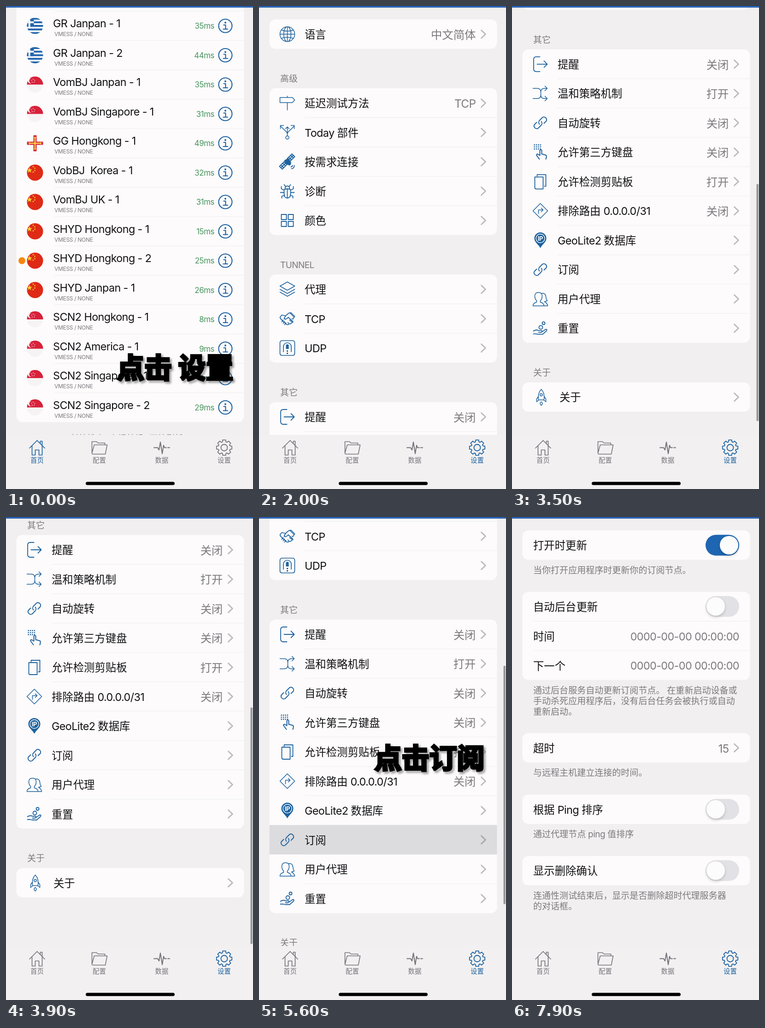
An HTML page with a canvas for the animation above (8 s loop, 536 px wide and 1045 px high).

```html
<!DOCTYPE html>
<html lang="zh-CN">
<head>
<meta charset="utf-8">
<title>订阅设置</title>
<style>
html, body { margin: 0; width: 100%; height: 100%; overflow: hidden; background: #f1efef; }
canvas { display: block; width: 100%; height: 100%; }
</style>
</head>
<body>
<canvas id="stage"></canvas>
<script>
const W = 536, H = 1045, LOOP = 8000, PITCH = 63.5, TAB_TOP = 928;
const BG = '#f1efef', CARD = '#fdfbfb', LINE = '#eeedf1', INK = '#111114', GREY = '#7b7a7d';
const BLUE = '#1d629f', ACCENT = '#1f66b2', BAR = '#2763b4', FAINT = 'rgba(60,60,67,.34)';
const FONT = 'Inter, "Noto Sans CJK SC", "Noto Sans CJK", sans-serif';

const canvas = document.getElementById('stage');
const ctx = canvas.getContext('2d');
const dpr = window.devicePixelRatio || 1;
canvas.width = W * dpr;
canvas.height = H * dpr;

const clamp = v => Math.max(0, Math.min(1, v));
const phase = (t, a, b) => clamp((t - a) / (b - a));
const easeOut = p => 1 - (1 - p) ** 3;
const easeInOut = p => p * p * (3 - 2 * p);
const ring = (x, y, r) => `M${x + r} ${y}A${r} ${r} 0 1 1 ${x - r} ${y}A${r} ${r} 0 1 1 ${x + r} ${y}Z`;
const box = (x, y, w, h) => `M${x} ${y}h${w}v${h}h${-w}Z`;

function gear() {
  let d = '';
  for (let i = 0; i < 8; i++) {
    [[-0.3, 13], [-0.19, 17], [0.19, 17], [0.3, 13]].forEach(([da, r]) => {
      const a = i * Math.PI / 4 + da;
      d += (d ? 'L' : 'M') + Math.sin(a) * r + ' ' + -Math.cos(a) * r;
    });
  }
  return d + 'Z' + ring(0, 0, 7);
}

function keypad() {
  let d = '';
  for (let y = 0; y < 3; y++) for (let x = 0; x < 4; x++) d += box(-14 + x * 4.4, -17 + y * 4.4, 2.4, 2.4);
  return d;
}

// s: stroked path, f: filled path, w: line width
const ICONS = {
  globe: { s: ring(0, 0, 16) + 'M-16 0H16M0-16V16M8 0A8 16 0 1 1-8 0A8 16 0 1 1 8 0ZM-13-9Q0-4 13-9M-13 9Q0 4 13 9' },
  sign: { s: 'M0-15V-12M-16-12H11L16-6.5L11-1H-16ZM0-1V15' },
  fork: { s: ring(0, 11, 3.5) + 'M0 7.5V-12M-4-8L0-12L4-8M0 5C0-2-5-3-15-14M-15-8V-15H-8M0 5C0-2 5-3 15-14M15-8V-15H8' },
  satellite: {
    s: 'M16-11L10-17L0-7L6-1ZM3-4L13-14M3-10L9-4M7-14L13-8M-1 6L-7 0L-17 10L-11 16ZM-4 3L-14 13M-10 3L-4 9M-14 7L-8 13M8 11Q11 11 11 8M9 15Q15 15 15 8',
    f: 'M-7-3L2-8L8 1Q9 6 5 8Q-3 7-7-3Z', w: 1.9
  },
  bug: { s: 'M-7-3Q0-7 7-3V6Q7 15 0 15Q-7 15-7 6ZM0-5V15M-5-5Q-5-11 0-11Q5-11 5-5M-4-10L-7-14M4-10L7-14M-7 3H-15M7 3H15M-7-2L-13-5V-10M7-2L13-5V-10M-6 9L-12 11V15M6 9L12 11V15', w: 1.8 },
  grid: { s: box(-13, -13, 11, 11) + box(2, -13, 11, 11) + box(-13, 2, 11, 11) + box(2, 2, 11, 11), w: 1.9 },
  layers: { s: 'M0-16L16-7L0 2L-16-7ZM-16 0L0 9L16 0M-16 6L0 15L16 6' },
  shake: { s: 'M-16-3L-12-8L-4-6L3-12L8-13L16-5L12 1L10 0M-4-6L-7 0Q-3 3 2-3L12 6Q13 9 9 9M10 7L5 3M9 9Q8 12 4 11L1 8M4 11Q2 14-2 12L-14 1L-16-3M-9 3L-12 7M-6 6L-9 10M-3 9L-6 13M5-13L14-4', w: 1.7 },
  tunnel: { s: 'M-11-16H11Q16-16 16-11V11Q16 16 11 16H-11Q-16 16-16 11V-11Q-16-16-11-16ZM-8.5 8V-3A8.5 8.5 0 0 1 8.5-3V8', f: 'M-3 2V-5A3 3 0 0 1 3-5V2ZM-1.5 5h3v3h-3ZM-1.5 10h3v3h-3Z', w: 1.7 },
  exit: { s: 'M-1-16H-9Q-14.5-16-14.5-10V10Q-14.5 16-9 16H-1M-7 0H15M8-7L15 0L8 7', w: 1.8 },
  shuffle: { s: 'M-16-11H-7Q1-11 1-3V3Q1 11 9 11H15M-16 11H-7Q1 11 1 3V-3Q1-11 9-11H15M10-16L15-11L10-6M10 6L15 11L10 16' },
  link: { s: 'M-2 3A6 6 0 0 1-2-5L5-12A6 6 0 0 1 13-4L8 1M2-3A6 6 0 0 1 2 5L-5 12A6 6 0 0 1-13 4L-8-1', w: 1.9 },
  keys: { s: 'M-1 7V-4Q1-7 3-4V4L11 6Q14 7 13 11L12 15M-1 7L-6 4Q-9 4-8 7L-2 15', f: keypad(), w: 2 },
  copy: { s: 'M-12-10H6V16H-9Q-12 16-12 13ZM-7-12V-15H12V10H9', w: 1.8 },
  route: { s: 'M0-16L16 0L0 16L-16 0ZM-4 6V-2H6M2-6L6-2L2 2' },
  pin: { f: 'M0 17C-5 8-13 4-13-4A13 13 0 1 1 13-4C13 4 5 8 0 17Z' },
  users: { s: 'M-16 15H8Q8 9 0 7V4Q4 0 4-6Q4-14-4-14Q-12-14-12-6Q-12 0-8 4V7Q-16 9-16 15ZM2-12Q11-14 12-5Q12 0 15 4L9 6Q15 9 16 15H8' },
  give: { s: ring(1, -2, 4) + ring(7, -11, 3) + 'M-15 6Q-9 2-4 5H3Q5 8 1 9H-4M3 8L12 2Q16 2 13 6L5 13H-5L-9 12H-15', w: 1.8 },
  rocket: { s: 'M0-17Q8-9 6 6H-6Q-8-9 0-17ZM-6-2L-10 4V10L-5 6M6-2L10 4V10L5 6M0 10Q5 13 0 18Q-5 13 0 10Z' + ring(0, -5, 2.5) },
  home: { s: 'M-16.5 1L0-15.5L16.5 1M-11-4V16H-4V5H4V16H11V-4M7-9V-14H11V-5', w: 1.7 },
  folder: { s: 'M-16 12V-13H-6L-3-10H12V-6M-16 12L-11-6H17L13 14H-15Z', w: 1.6 },
  pulse: { s: 'M-17 0H-9L-6 5L-3-12L1 13L4-5L6 0H10M13 0H17', w: 2 },
  gear: { s: gear(), w: 1.8 },
  info: { s: ring(0, 0, 14.5) + 'M-3.5-2H0.5V7M-4.5 7H5', f: ring(0, -7, 2), w: 2.1 },
  chevron: { s: 'M-4.5-8.5L4.5 0L-4.5 8.5', w: 2.7 }
};

for (const key in ICONS) {
  const icon = ICONS[key];
  if (icon.s) icon.s = new Path2D(icon.s);
  if (icon.f) icon.f = new Path2D(icon.f);
}

function at(x, y, draw) {
  ctx.save();
  ctx.translate(x, y);
  draw();
  ctx.restore();
}

function icon(name, x, y, color = BLUE) {
  const { s, f, w = 1.5 } = ICONS[name];
  at(x, y, () => {
    ctx.strokeStyle = ctx.fillStyle = color;
    ctx.lineWidth = w;
    ctx.lineJoin = ctx.lineCap = 'round';
    if (f) ctx.fill(f);
    if (s) ctx.stroke(s);
  });
}

// Latin runs are tracked slightly tighter than Chinese ones.
function text(str, x, cy, size, color = INK, align = 0, weight = 400) {
  ctx.font = `${weight} ${size}px ${FONT}`;
  ctx.fillStyle = color;
  const runs = str.match(/[\x00-\x7f]+|[^\x00-\x7f]+/g).map(run => {
    const gap = run.charCodeAt(0) < 128 ? -0.026 * size + 'px' : '0px';
    ctx.letterSpacing = gap;
    return { run, gap, w: ctx.measureText(run).width };
  });
  x -= align * runs.reduce((sum, r) => sum + r.w, 0);
  for (const { run, gap, w } of runs) {
    ctx.letterSpacing = gap;
    ctx.fillText(run, x, cy + size * 0.365);
    x += w;
  }
  ctx.letterSpacing = '0px';
}

function rect(x, y, w, h, r, color) {
  ctx.fillStyle = color;
  ctx.beginPath();
  ctx.roundRect(x, y, w, h, r);
  ctx.fill();
}

function disc(x, y, r, color) {
  ctx.fillStyle = color;
  ctx.beginPath();
  ctx.arc(x, y, r, 0, 7);
  ctx.fill();
}

function card(y, rows, inset) {
  rect(22.5, y, 494, rows * PITCH, 13, CARD);
  for (let i = 1; i < rows; i++) rect(inset, y + i * PITCH - 0.5, 516.5 - inset, 1, 0, LINE);
}

function star(x, y, r, color) {
  ctx.fillStyle = color;
  ctx.beginPath();
  for (let i = 0; i < 10; i++) {
    const a = i * Math.PI / 5, d = i % 2 ? r * 0.4 : r;
    ctx.lineTo(x + Math.sin(a) * d, y - Math.cos(a) * d);
  }
  ctx.fill();
}

const FLAGS = {
  GR() {
    const s = 35 / 9, left = -22, top = -17.5, blue = '#2366ad', white = '#fdfcfd';
    rect(-18, -18, 36, 36, 0, white);
    for (let i = 0; i < 9; i += 2) rect(-18, top + i * s, 36, s, 0, blue);
    rect(left, top, 5 * s, 5 * s, 0, blue);
    rect(left, top + 2 * s, 5 * s, s, 0, white);
    rect(left + 2 * s, top, s, 5 * s, 0, white);
  },
  SG() {
    rect(-18, -18, 36, 36, 0, '#f6f3f4');
    rect(-18, -18, 36, 18, 0, '#d8213a');
    disc(-10, -8, 5.5, '#fff');
    disc(-7.5, -8, 5.2, '#d8213a');
    for (let i = 0; i < 5; i++) {
      const a = i * Math.PI * 0.4;
      star(-4 + Math.sin(a) * 3.6, -8 - Math.cos(a) * 3.6, 1.5, '#fff');
    }
  },
  GG() {
    rect(-18, -18, 36, 36, 0, '#fdfcfd');
    rect(-3.5, -18, 7, 36, 0, '#d5283b');
    rect(-18, -3.5, 36, 7, 0, '#d5283b');
    rect(-1.3, -13, 2.6, 26, 0, '#f6d34a');
    rect(-13, -1.3, 26, 2.6, 0, '#f6d34a');
    for (const x of [-13.5, 11.5]) {
      rect(x, -2.5, 2, 5, 0, '#f6d34a');
      rect(-2.5, x, 5, 2, 0, '#f6d34a');
    }
  },
  CN() {
    rect(-18, -18, 36, 36, 0, '#df2a16');
    star(-12, -5, 6.5, '#fbd02e');
    [[-4, -13], [-0.5, -9.5], [-0.5, -4.5], [-4, -1]].forEach(([x, y]) => star(x, y, 2.2, '#fbd02e'));
  }
};

const NODES = [
  ['GR', 'GR Janpan - 1', 35], ['GR', 'GR Janpan - 2', 44],
  ['SG', 'VomBJ Janpan - 1', 35], ['SG', 'VomBJ Singapore - 1', 31],
  ['GG', 'GG Hongkong - 1', 49], ['CN', 'VobBJ  Korea - 1', 32],
  ['CN', 'VomBJ UK - 1', 31], ['CN', 'SHYD Hongkong - 1', 15],
  ['CN', 'SHYD Hongkong - 2', 25], ['CN', 'SHYD Janpan - 1', 26],
  ['SG', 'SCN2 Hongkong - 1', 8], ['SG', 'SCN2 America - 1', 9],
  ['SG', 'SCN2 Singapore - 1', 9], ['SG', 'SCN2 Singapore - 2', 29]
];

function homePage() {
  card(11.3 - PITCH, 15, 105);
  NODES.forEach(([flag, name, ms], i) => {
    const y = 43 + i * PITCH;
    at(63, y, () => {
      ctx.beginPath();
      ctx.arc(0, 0, 17.5, 0, 7);
      ctx.clip();
      FLAGS[flag]();
    });
    text(name, 102, y - 5.5, 23.36);
    text('VMESS / NONE', 105, y + 18, 12, GREY);
    text(ms + 'ms', 452, y, 16.9, '#47945f', 1);
    icon('info', 476, y, '#1d62a2');
  });
  disc(34.5, 551, 7.5, '#f6870d');
  text('长按排序   左滑编辑   下拉刷新', 262, 935, 18, GREY, 0.5);
}

const SECTIONS = [
  { y: 29, rows: [['globe', '语言', '中文简体']] },
  { y: 178, title: '高级', rows: [
    ['sign', '延迟测试方法', 'TCP'], ['fork', 'Today 部件'], ['satellite', '按需求连接'],
    ['bug', '诊断'], ['grid', '颜色']] },
  { y: 581, title: 'TUNNEL', rows: [['layers', '代理'], ['shake', 'TCP'], ['tunnel', 'UDP']] },
  { y: 857, title: '其它', rows: [
    ['exit', '提醒', '关闭'], ['shuffle', '温和策略机制', '打开'], ['link', '自动旋转', '关闭'],
    ['keys', '允许第三方键盘', '关闭'], ['copy', '允许检测剪贴板', '打开'],
    ['route', '排除路由 0.0.0.0/31', '关闭'], ['pin', 'GeoLite2 数据库'], ['link', '订阅'],
    ['users', '用户代理'], ['give', '重置']] },
  { y: 1577.5, title: '关于', rows: [['rocket', '关于']] }
];

function settingsRow([name, label, value], y) {
  const rocket = name === 'rocket';
  icon(name, rocket ? 63.5 : 61.5, y);
  if (name === 'pin') {
    ctx.strokeStyle = '#fff';
    ctx.lineWidth = 1.4;
    ctx.beginPath();
    ctx.arc(61.5, y - 4, 9.5, 0, 7);
    ctx.stroke();
    text('IP', 61.5, y - 4, 13, '#fff', 0.5, 700);
  }
  text(label, rocket ? 103 : 99, y + 0.5, 23.36);
  if (value) text(value, 470.5, y + 1, 24.4, GREY, 1);
  icon('chevron', 487, y, FAINT);
}

function settingsPage(t) {
  const scroll = scrollAt(t);
  at(0, -scroll, () => {
    for (const { y, title, rows } of SECTIONS) {
      if (title) text(title, 46, y - 21, 18.9, GREY);
      card(y, rows.length, 99);
      rows.forEach((row, i) => {
        const top = y + i * PITCH;
        if (row[1] === '订阅' && t >= 5500) rect(22.5, top, 494, PITCH, 0, '#dcdbde');
        settingsRow(row, top + 32);
      });
    }
  });
  ctx.globalAlpha = phase(t, 2700, 2900);
  rect(530.5, 8 + 0.494 * scroll, 4.5, 530 - 0.022 * scroll, 2.25, '#98979b');
  ctx.globalAlpha = 1;
}

function scrollAt(t) {
  if (t < 3100) return 122 * phase(t, 2800, 3100) ** 2;
  if (t < 4300) return 122 + 696 * easeOut(phase(t, 3100, 3800));
  return 818 - 183 * easeInOut(phase(t, 4300, 4900));
}

function toggle(y, on = 0) {
  rect(420, y - 22.5, 73, 45, 22.5, '#e2e1e5');
  ctx.globalAlpha = on;
  rect(420, y - 22.5, 73, 45, 22.5, ACCENT);
  ctx.globalAlpha = 1;
  ctx.save();
  ctx.shadowColor = 'rgba(0,0,0,.18)';
  ctx.shadowBlur = 6 * dpr;
  ctx.shadowOffsetY = 3 * dpr;
  disc(442 + 29 * on, y, 20, '#fdfcfd');
  ctx.restore();
}

function subscriptionPage(t) {
  const label = (s, y) => text(s, 46, y + 0.5, 23.36);
  const note = (y, ...lines) => lines.forEach((s, i) => text(s, 46, y + i * 23.2, 19.05, GREY));
  [[29, 1], [162, 3], [467.5, 1], [600.5, 1], [733.5, 1]].forEach(([y, n]) => card(y, n, 46));
  label('打开时更新', 61);
  toggle(61, easeInOut(phase(t, 7300, 7600)));
  note(115, '当你打开应用程序时更新你的订阅节点。');
  label('自动后台更新', 193.5);
  toggle(193.5);
  label('时间', 258);
  label('下一个', 321.5);
  for (const y of [258, 321.5]) text('0000-00-00 00:00:00', 493, y, 23.36, GREY, 1);
  note(375, '通过后台服务自动更新订阅节点。 在重新启动设备或', '手动杀死应用程序后，没有后台任务会被执行或自动', '重新启动。');
  label('超时', 500);
  text('15', 470.5, 501, 24.4, GREY, 1);
  icon('chevron', 487, 499.5, FAINT);
  note(553.5, '与远程主机建立连接的时间。');
  label('根据 Ping 排序', 632.5);
  toggle(632.5);
  note(686.5, '通过代理节点 ping 值排序');
  label('显示删除确认', 765);
  toggle(765);
  note(819, '连通性测试结束后，显示是否删除超时代理服务器', '的对话框。');
}

const TABS = [['home', '首页', 67.5], ['folder', '配置', 202.5], ['pulse', '数据', 338], ['gear', '设置', 473.5]];

function chrome(active) {
  rect(0, TAB_TOP, W, H - TAB_TOP, 0, '#f2f0f1');
  TABS.forEach(([name, label, x], i) => {
    const color = i === active ? BLUE : '#75747a';
    icon(name, x, 955.5, color);
    text(label, x, 982.5, 14.4, color, 0.5);
  });
  rect(173, 1029.5, 193, 7, 3.5, '#000');
  rect(0, 0, W, 3.5, 0, BAR);
}

function caption(str, x, cy) {
  ctx.save();
  ctx.font = '900 59.8px "Noto Sans CJK SC", "Noto Sans CJK", sans-serif';
  ctx.lineJoin = 'miter';
  ctx.miterLimit = 2;
  ctx.lineWidth = 4.2;
  ctx.fillStyle = ctx.strokeStyle = '#000';
  ctx.shadowColor = 'rgba(70,70,70,.6)';
  ctx.shadowBlur = 4 * dpr;
  ctx.shadowOffsetX = ctx.shadowOffsetY = 3.5 * dpr;
  ctx.strokeText(str, x, cy + 22);
  ctx.shadowColor = 'transparent';
  ctx.fillText(str, x, cy + 22);
  ctx.restore();
}

function page(x, draw) {
  at(x, 0, () => {
    rect(0, 0, W, H, 0, BG);
    draw();
  });
}

function render(t) {
  ctx.setTransform(canvas.width / W, 0, 0, canvas.height / H, 0, 0);
  const home = t < 1200;
  const push = easeOut(phase(t, 5700, 6200));
  if (home) page(0, homePage);
  else if (push < 1) page(-0.3 * W * push, () => settingsPage(t));
  if (push > 0) page(W * (1 - push), () => subscriptionPage(t));
  chrome(home ? 0 : 3);
  if (home) caption('点击 设置', 240.5, 783);
  if (t >= 4700 && t < 5800) caption('点击订阅', 250, 522);
}

const start = performance.now();
function tick() {
  const t = (performance.now() - start) % LOOP;
  render(Math.floor(t / 100) * 100);
  requestAnimationFrame(tick);
}
tick();
</script>
</body>
</html>
```
